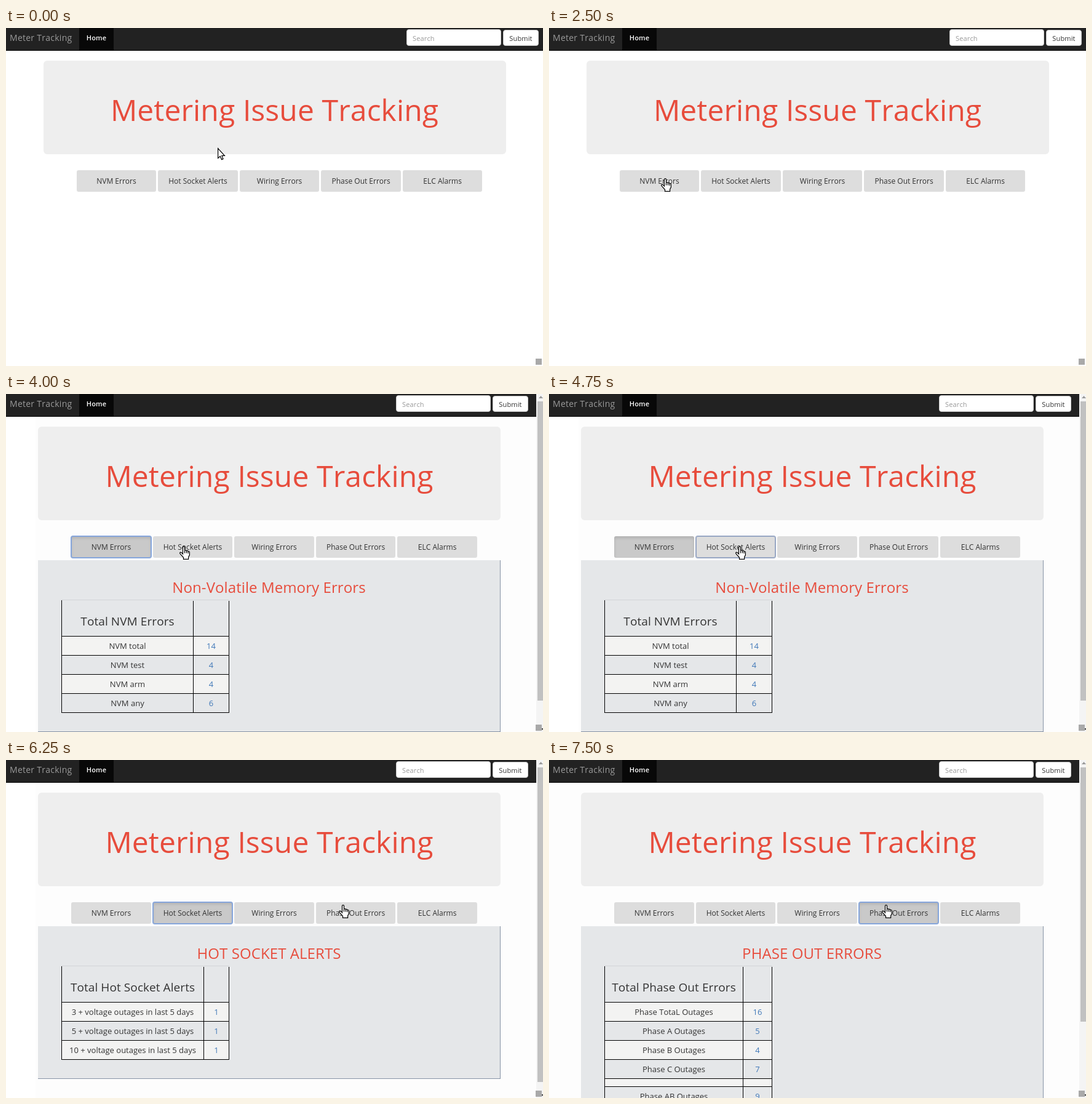
Recreate the animation shown at these times as an HTML page. Size 873 by 549 pixels, loop 8 s.

```html
<!DOCTYPE html>
<html lang="en">
<head>
<meta charset="utf-8">
<title>Metering Issue Tracking</title>
<style>
:root {
  --glow: 0 0 0 1px #86a6dc, inset 0 0 0 1px #86a6dc;
  --inset: inset 0 3px 5px rgba(0,0,0,.12);
}
html, body { margin: 0; width: 100%; height: 100%; overflow: hidden; }
body { background: #fff; font: 13px "Open Sans", sans-serif; color: #333; font-kerning: none; }
* { box-sizing: border-box; }
#stage { position: absolute; left: 0; top: 0; width: 873px; height: 549px; overflow: hidden; }
#stage, .anim { animation: 8s step-end infinite; }
#stage { animation-name: page-bg; }
.abs, nav *, #main, #main *, .panel, .bar, .bar *, .cursor { position: absolute; }

nav { position: absolute; width: 873px; height: 37px; background: #222; border-bottom: 1px solid #080808; line-height: 31px; font-size: 11px; letter-spacing: .15px; }
.brand { left: 6px; font-size: 14px; letter-spacing: .27px; color: #999; white-space: nowrap; }
.home { left: 119px; width: 56px; height: 36px; background: #080808; color: #fff; font-weight: 600; text-align: center; }
.form { left: 651px; animation-name: form; }
.field, .submit { background: #fff; border: 1px solid #ccc; border-radius: 4px; }
.field { top: 2px; width: 154px; height: 27px; padding-left: 9px; line-height: 27px; color: #999; }
.submit { left: 157px; top: 3px; width: 58px; height: 26px; line-height: 25px; text-align: center; }

#main { left: 0; top: 0; animation-name: shift; }
h1 { left: 60.5px; top: 53px; width: 752px; height: 152px; margin: 0; border-radius: 6px; background: #eee; color: #e74c3c; font-size: 48px; font-weight: 400; line-height: 159px; letter-spacing: .1px; text-align: center; white-space: nowrap; }
.btn { left: calc(114.7px + 132.55px * var(--i)); top: 231px; width: 129.5px; height: 35px; border-radius: 3px; background: #ddd; font-size: 12px; line-height: 35px; text-align: center; white-space: nowrap; }

.panel { left: 52px; top: 270px; width: 752px; height: var(--h); background: #e5e7e9; border: solid #8793a6; border-width: 0 1px 1px 0; visibility: hidden; }
h2 { margin: 0; color: #e74c3c; font-size: 24px; font-weight: 400; line-height: 87px; letter-spacing: .08px; text-align: center; }
.grid { position: absolute; left: 38px; top: 65px; width: 273px; display: grid; grid-template-columns: var(--c) 1fr; grid-template-rows: 58px; grid-auto-rows: 31px; border: solid #000; border-width: 0 0 0 1px; box-shadow: 0 -1px #d3d5d8; padding-top: 1px; margin-top: 0; line-height: 30px; text-align: center; white-space: nowrap; }
.grid > * { border: solid #000; border-width: 0 1px 1px 0; }
.grid .head { font-size: 19px; line-height: 66px; letter-spacing: .08px; }
.grid b { font-weight: 400; color: #4078b8; }
.odd { background: #f3f3f2; }
.gap { height: 13px; }
.nvm { animation-name: page1; }
.hot { animation-name: page2; }
.phase { animation-name: page3; }
.phase .grid { grid-template-rows: 58px repeat(4, 31px) 13px; }
#b1 { animation-name: btn1; }
#b2 { animation-name: btn2; }
#b4 { animation-name: btn4; }

.bar { left: 862px; top: 0; width: 11px; height: 549px; background: #f4f4f4; visibility: hidden; animation-name: bar; }
.thumb { left: 2px; top: 12px; width: 9px; background: #c1c1c1; animation-name: thumb; }
.bar svg { left: 0; top: 0; }
.grip { left: 861px; top: 537px; width: 10px; height: 10px; background: #a9a9a9; }

.cursor { left: 0; top: 0; overflow: visible; fill: #fff; stroke: #000; stroke-width: 1.2; }
.arrow { animation-name: arrow; }
.hand { visibility: hidden; animation-name: hand; }

@keyframes page-bg {
  0% { background: #fff; }
  37.5% { background: linear-gradient(90deg, #fff 48px, #fdfdfd 0); }
  93.75%, 100% { background: #fdfdfd; }
}
@keyframes shift { 0% { left: 0; } 37.5%, 100% { left: -8.5px; } }
@keyframes form { 0% { left: 651px; } 37.5%, 100% { left: 634px; } }
@keyframes bar { 0% { visibility: hidden; } 37.5%, 100% { visibility: visible; } }
@keyframes thumb { 0% { height: 486px; } 62.5% { height: 511px; } 87.5%, 100% { height: 413px; } }
@keyframes page1 { 0% { visibility: hidden; } 37.5% { visibility: visible; } 62.5%, 100% { visibility: hidden; } }
@keyframes page2 { 0% { visibility: hidden; } 62.5% { visibility: visible; } 87.5%, 100% { visibility: hidden; } }
@keyframes page3 { 0% { visibility: hidden; } 87.5%, 100% { visibility: visible; } }
@keyframes btn1 {
  0% { background: #ddd; box-shadow: none; }
  37.5% { background: #cdcdcd; box-shadow: var(--glow), var(--inset); }
  40.625% { background: #c9c9c9; box-shadow: var(--glow), var(--inset); }
  59.375% { background: #c9c9c9; box-shadow: var(--inset); }
  62.5% { background: #d2d2d2; box-shadow: none; }
  65.625%, 100% { background: #ddd; box-shadow: none; }
}
@keyframes btn2 {
  0% { background: #ddd; box-shadow: none; }
  59.375% { background: #ddd; box-shadow: 0 0 0 1px #98a7c4, inset 0 0 0 1px #98a7c4; }
  62.5% { background: #cdcdcd; box-shadow: var(--glow), var(--inset); }
  65.625% { background: #c9c9c9; box-shadow: var(--glow), var(--inset); }
  87.5% { background: #d2d2d2; box-shadow: none; }
  90.625%, 100% { background: #ddd; box-shadow: none; }
}
@keyframes btn4 {
  0% { background: #ddd; box-shadow: none; }
  87.5% { background: #cdcdcd; box-shadow: var(--glow), var(--inset); }
  90.625%, 100% { background: #c9c9c9; box-shadow: var(--glow), var(--inset); }
}
@keyframes arrow {
  0% { transform: translate(344px, 195px); visibility: visible; }
  6.25% { transform: translate(314px, 182px); }
  9.375% { transform: translate(306px, 183px); }
  12.5% { transform: translate(292px, 189px); }
  15.625% { transform: translate(278px, 190px); }
  18.75% { transform: translate(217px, 195px); }
  21.875% { transform: translate(196px, 200px); }
  25% { transform: translate(192px, 201px); }
  28.125%, 100% { transform: translate(192px, 201px); visibility: hidden; }
}
@keyframes hand {
  0% { transform: translate(183px, 232px); visibility: hidden; }
  28.125% { transform: translate(183px, 232px); visibility: visible; }
  31.25% { transform: translate(182px, 244px); }
  46.875% { transform: translate(216px, 247px); }
  50% { transform: translate(282px, 247px); }
  53.125% { transform: translate(303px, 247px); }
  71.875% { transform: translate(427px, 247px); }
  75% { transform: translate(509px, 246px); }
  78.125%, 100% { transform: translate(541px, 235px); visibility: visible; }
}
</style>
</head>
<body>
<div id="stage">
  <nav>
    <span class="brand">Meter Tracking</span>
    <span class="home">Home</span>
    <div class="form anim">
      <span class="field">Search</span>
      <span class="submit">Submit</span>
    </div>
  </nav>

  <div id="main" class="anim">
    <h1>Metering Issue Tracking</h1>
    <div class="btn anim" id="b1" style="--i:0">NVM Errors</div>
    <div class="btn anim" id="b2" style="--i:1">Hot Socket Alerts</div>
    <div class="btn" style="--i:2">Wiring Errors</div>
    <div class="btn anim" id="b4" style="--i:3">Phase Out Errors</div>
    <div class="btn" style="--i:4">ELC Alarms</div>
  </div>

  <section class="panel nvm anim" style="--h:279px; --c:214px">
    <h2>Non-Volatile Memory Errors</h2>
    <div class="grid">
      <span class="head">Total NVM Errors</span><b></b>
      <span class="odd">NVM total</span><b class="odd">14</b>
      <span>NVM test</span><b>4</b>
      <span class="odd">NVM arm</span><b class="odd">4</b>
      <span>NVM any</span><b>6</b>
    </div>
  </section>

  <section class="panel hot anim" style="--h:248px; --c:231px">
    <h2>HOT SOCKET ALERTS</h2>
    <div class="grid">
      <span class="head">Total Hot Socket Alerts</span><b></b>
      <span class="odd">3 + voltage outages in last 5 days</span><b class="odd">1</b>
      <span>5 + voltage outages in last 5 days</span><b>1</b>
      <span class="odd">10 + voltage outages in last 5 days</span><b class="odd">1</b>
    </div>
  </section>

  <section class="panel phase anim" style="--h:300px; --c:225px">
    <h2>PHASE OUT ERRORS</h2>
    <div class="grid">
      <span class="head">Total Phase Out Errors</span><b></b>
      <span class="odd">Phase TotaL Outages</span><b class="odd">16</b>
      <span>Phase A Outages</span><b>5</b>
      <span class="odd">Phase B Outages</span><b class="odd">4</b>
      <span>Phase C Outages</span><b>7</b>
      <span class="odd gap"></span><b class="odd gap"></b>
      <span>Phase AB Outages</span><b>9</b>
    </div>
  </section>

  <div class="bar anim">
    <div class="thumb anim"></div>
    <svg width="11" height="549"><path d="M4 7 7.5 3 11 7Z" fill="#999"/><path d="M8 543H12L10 546Z" fill="#444"/></svg>
  </div>
  <div class="abs grip"></div>

  <svg class="cursor arrow anim" width="13" height="20">
    <path d="M.6.6V16.5L4.2 13.2 6.6 18.6 9 17.6 6.8 12.3H11.4Z"/>
  </svg>
  <svg class="cursor hand anim" width="18" height="23">
    <path d="M5.5 13V2Q5.5.6 7 .6T8.5 2V7.5Q8.7 6.6 10 6.6T11.4 8Q11.6 7.4 12.7 7.4T14 9Q14.2 8.4 15.2 8.5T16.4 10V14.5L14.6 18V21.4H6.5V18.5L1 12.3Q.1 10.6 1.6 10.2 3.2 10 5.5 13Z"/>
    <path d="M8.5 7.5V11.5M11.4 8V11.5M14 9V12" fill="none"/>
  </svg>
</div>
</body>
</html>
```
